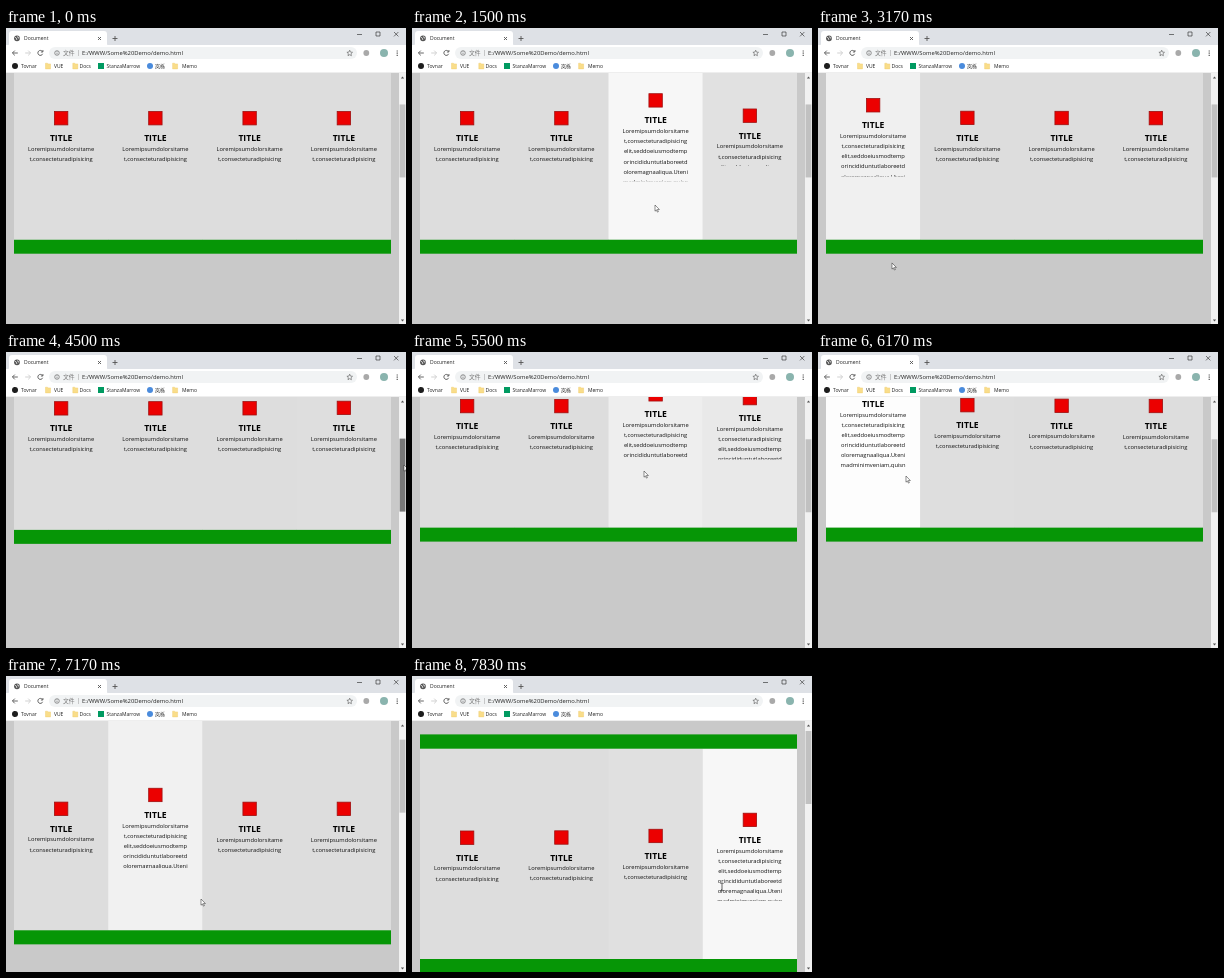
Write an HTML page that moves like this. It is 400 by 296 pixels and loops after 8 s.

```html
<!DOCTYPE html>
<html lang="en">
<head>
<meta charset="utf-8">
<title>Document</title>
<style>
  html, body { margin: 0; width: 100%; height: 100%; overflow: hidden; background: #c9c9c9; }
  svg { display: block; width: 400px; height: 296px; }
  text { font-family: "Open Sans", "Noto Sans", "Noto Sans CJK SC", sans-serif; white-space: pre; }
  .ui { font-size: 5px; fill: #222; }
  .url { font-size: 5.85px; fill: #222; }
  .muted { fill: #777; }
  .title { font-size: 8.6px; font-weight: 700; text-anchor: middle; fill: #000; }
  .copy { font-size: 5.75px; text-anchor: middle; fill: #111; }
  .line { fill: none; stroke: #555; stroke-width: .9; }
  .thin { stroke-width: .6; }
</style>
</head>
<body>
<svg viewBox="0 0 400 296" xmlns="http://www.w3.org/2000/svg">
  <defs id="clips"></defs>
  <rect width="400" height="296" fill="#c9c9c9"/>
  <g id="page">
    <rect x="8" y="58.4" width="377" height="238.8" fill="#069606"/>
    <rect x="8" y="72.7" width="377" height="210.3" fill="#ddd"/>
    <g id="cols"></g>
  </g>

  <g id="scrollbar">
    <rect x="393" y="45" width="7" height="251" fill="#f1f1f1"/>
    <path d="M394.8 50.4l1.7-2 1.7 2zM394.8 291.4l1.7 2 1.7-2z" fill="#555"/>
    <rect id="thumb" x="393.6" width="5.8" height="73"/>
  </g>

  <g id="chrome">
    <rect width="400" height="18" fill="#dee1e6"/>
    <path d="M1 18q2 0 2-2V6q0-3 3-3h92q3 0 3 3v10q0 2 2 2z" fill="#fff"/>
    <rect y="17" width="400" height="28" fill="#fff"/>
    <rect y="44.5" width="400" height=".5" fill="#ddd"/>
    <circle cx="11" cy="10.3" r="2.9" fill="#555"/>
    <path d="M9 9.3l1.5 1 .3 1.6M11.6 8.4l.4 1.4 1.3.4" stroke="#fff" stroke-width=".8" fill="none"/>
    <path class="line" d="M92 9l3 3m0-3l-3 3M106.5 10.5h5m-2.5-2.5v5"/>
    <path class="line thin" d="M351 6.5h5M370 4h4v4h-4zM388 4l4.4 4.4m0-4.4L388 8.4" style="stroke:#222"/>
    <path class="line" d="M11.8 25H6.5m2.3-2.4L6.4 25l2.4 2.4"/>
    <path class="line" d="M19.2 25h5.3m-2.3-2.4l2.4 2.4-2.4 2.4" style="stroke:#ccc"/>
    <path class="line" d="M36.5 23.6a2.5 2.5 0 1 0 .2 2.2M36.9 22v2h-2"/>
    <rect x="43" y="19" width="308" height="12" rx="6" fill="#f1f3f4"/>
    <circle class="line thin" cx="51" cy="25" r="2.3"/>
    <path class="line thin" d="M51 24.6v1.7m0-2.9v.6"/>
    <path class="line thin" d="M72.5 22v6" style="stroke:#aaa"/>
    <path class="line thin" d="M343.7 22.2l.8 1.9 2 .2-1.5 1.4.4 2-1.7-1-1.7 1 .4-2-1.5-1.4 2-.2z"/>
    <circle cx="360.3" cy="25" r="2.9" fill="#a9a9a9"/>
    <circle cx="378" cy="25" r="4" fill="#8ab4ae"/>
    <path d="M391.2 22.4v5.6" stroke="#444" stroke-width="1.1" stroke-dasharray="1.1 1.1"/>
    <text class="ui" x="18" y="12.3">Document</text>
    <text class="url muted" x="57" y="27.1">文件</text>
    <text class="url" x="76" y="27.1">E:/WWW/Some%20Demo/demo.html</text>

    <circle cx="9" cy="38" r="3" fill="#1d1d1d"/>
    <path d="M39.5 35.2h2l.6.7h2.4v5h-5zm27.3 0h2l.6.7h2.4v5h-5zm99.8 0h2l.6.7h2.4v5h-5z" fill="#f9dd8a" stroke="#ecc863" stroke-width=".4"/>
    <rect x="92" y="35" width="6" height="6" fill="#009a61"/>
    <circle cx="144" cy="38" r="3" fill="#4a8bdc"/>
    <g class="ui">
      <text x="15" y="39.8">Tovnar</text>
      <text x="48" y="39.8">VUE</text>
      <text x="73.5" y="39.8">Docs</text>
      <text x="100.5" y="39.8">StanzaMarrow</text>
      <text x="149" y="39.8">岚栎</text>
      <text x="176" y="39.8">Memo</text>
    </g>
  </g>

  <g id="cursor">
    <path id="arrow" d="M0 0v6.2l1.4-1.3 1 2.2 1-.4-1-2.2h2z" fill="#fff" stroke="#222" stroke-width=".5"/>
    <path id="beam" d="M-1.6-3.6h1.2l.4.4.4-.4h1.2M0-3.2v6.4M-1.6 3.6h1.2l.4-.4.4.4h1.2" fill="none" stroke="#222" stroke-width=".7"/>
  </g>
</svg>
<script>
const $ = id => document.getElementById(id);
const TICKS = 48, RATE = 6, STEPS = 40;         // 6 pictures a second
const LEFT = 8, COL_W = 377 / 4, TOP = 73, COL_H = 210;
const MAX_LIFT = 23.5, EASE = .15;
const ENTER = 1, PRESS = 4.3, RELEASE = 5.18;   // seconds

const copy = ["Loremipsumdolorsitame", "t,consecteturadipisicing", "elit,seddoeiusmodtemp",
  "orincididuntutlaboreetd", "oloremagnaaliqua.Uteni", "madminimveniam,quisn", "ostrudexercitationulla"];

// Mouse turning points: [seconds, x, y]
const mouse = [
  [1, 325, 287], [1.2, 310, 211], [1.5, 243, 177], [1.9, 60, 172], [2.35, 330, 182],
  [2.65, 65, 170], [3, 64, 190], [3.167, 74, 235], [3.5, 245, 150], [3.95, 390, 112],
  [4.333, 397, 102], [4.5, 398, 113], [5.2, 398, 114], [5.8, 66, 124], [6.167, 88, 124],
  [6.667, 188, 165], [7, 193, 228], [7.167, 195, 223], [7.5, 240, 290], [7.6, 318, 288], [7.833, 325, 222]
];

const ramp = (t, from, to) => Math.min(1, Math.max(0, (t - from) / (to - from)));
const centre = col => LEFT + COL_W * (col + .5);

// First the scrollbar is dragged down, later the wheel brings the page to its top.
const scrollAt = t => (71.5 + 36.1 * ramp(t, 4.35, 4.51)) * (1 - ramp(t, 6.83, 7.29));

function mouseAt(t) {
  const i = Math.max(1, mouse.findIndex(p => p[0] >= t));
  const [t0, x0, y0] = mouse[i - 1], [t1, x1, y1] = mouse[i];
  const k = ramp(t, t0, t1);
  return { x: x0 + (x1 - x0) * k, y: y0 + (y1 - y0) * k };
}

function columnAt(t) {
  if (t < ENTER) return -1;
  const { x, y } = mouseAt(t), localY = y + scrollAt(t) - TOP;
  return localY > 0 && localY < COL_H ? Math.floor((x - LEFT) / COL_W) : -1;
}

// Hover levels per tick: each column eases to 1 under the mouse, else back to 0.
function simulate() {
  const dt = 1 / RATE / STEPS, gain = 1 - Math.exp(-dt / EASE);
  let levels = [0, 0, 0, 0];
  return Array.from({ length: TICKS }, (_, tick) => {
    const now = levels;
    for (let s = 0; s < STEPS; s++) {
      const hit = columnAt(tick / RATE + s * dt);
      levels = levels.map((v, c) => v + ((c === hit ? 1 : 0) - v) * gain);
    }
    return now;
  });
}

function build() {
  for (let c = 0; c < 4; c++) {
    const x = centre(c);
    const lines = copy.map((s, i) => `<text class="copy" x="${x}" y="${121.4 + i * 10.15}">${s}</text>`).join("");
    $("clips").innerHTML += `<clipPath id="clip${c}"><rect x="${x - 36}" y="113" width="72"/></clipPath>`;
    $("cols").innerHTML += `<g transform="translate(0 ${TOP})">
      <rect class="back" x="${LEFT + COL_W * c}" width="${COL_W}" height="${COL_H}"/>
      <g class="body">
        <rect x="${x - 6.7}" y="82" width="13.4" height="13.4" fill="#ec0000" stroke="#a01010" stroke-width=".8"/>
        <text class="title" x="${x}" y="111.8">TITLE</text>
        <g clip-path="url(#clip${c})">${lines}</g>
      </g></g>`;
  }
}

build();
const history = simulate();
const backs = document.querySelectorAll(".back");
const bodies = document.querySelectorAll(".body");
const clipRects = document.querySelectorAll("clipPath rect");

function draw(ms) {
  const tick = Math.floor((ms + 5) * RATE / 1000) % TICKS, t = tick / RATE;
  const scroll = scrollAt(t), { x, y } = mouseAt(t);
  const localY = y + scroll - TOP;
  let overText = false;

  $("page").setAttribute("transform", `translate(0 ${-scroll})`);
  history[tick].forEach((level, c) => {
    const lift = MAX_LIFT * level, shade = Math.round(221 + 34 * level);
    backs[c].setAttribute("fill", `rgb(${shade},${shade},${shade})`);
    bodies[c].setAttribute("transform", `translate(0 ${-lift})`);
    clipRects[c].setAttribute("height", 21 + 2 * lift);
    if (Math.abs(x - centre(c)) < 33 && Math.abs(localY - 124) < 10 + lift) overText = true;
  });

  const pressed = t >= PRESS && t < RELEASE, near = x > 393;
  $("thumb").setAttribute("y", 55 + scroll * .3);
  $("thumb").setAttribute("fill", pressed ? "#787878" : near ? "#a8a8a8" : "#c1c1c1");

  $("cursor").style.display = t < ENTER ? "none" : "";
  $("cursor").setAttribute("transform", `translate(${x} ${y})`);
  $("arrow").style.display = overText ? "none" : "";
  $("beam").style.display = overText ? "" : "none";
}

const began = performance.now();
function loop() {
  draw((performance.now() - began) % (TICKS / RATE * 1000));
  requestAnimationFrame(loop);
}
loop();
</script>
</body>
</html>
```
